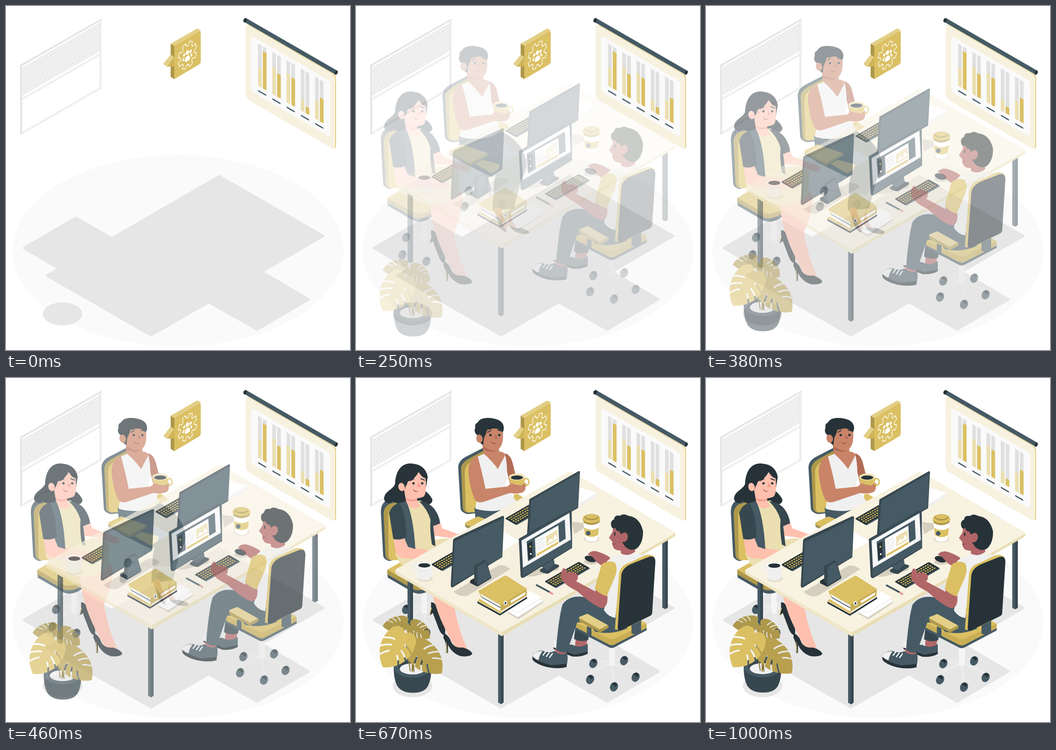
Write an HTML page that moves like this. It is 748 px wide and 748 px high and loops after 1040 ms.

```html
<!DOCTYPE html>
<html lang="en">
<head>
<meta charset="utf-8">
<title>Office teamwork</title>
<style>
html, body { margin: 0; width: 100%; height: 100%; overflow: hidden; background: #fff; }
svg { display: block; width: 100%; height: 100%; }
.ink { fill: #263238; } .deep { fill: #37474f; } .slate { fill: #455a64; }
.gold { fill: #dbc063; } .pale { fill: #ebdfb1; } .mid { fill: #e3cf86; } .bronze { fill: #ae984b; }
.cream { fill: #f8f2e1; } .white { fill: #fff; } .off { fill: #f0f0f0; } .grey { fill: #e0e0e0; }
.shade { fill: #d6cfbf; }
.rose { fill: #ffc0ae; } .tan { fill: #c98468; } .umber { fill: #b26b55; } .plum { fill: #b16668; }
.line { fill: none; stroke-linecap: round; stroke-linejoin: round; }
</style>
</head>
<body>
<svg viewBox="0 0 748 748">
<defs>
  <g id="keys">
    <rect y="2" width="86" height="27" rx="2" fill="#455a64"/>
    <rect width="86" height="26" rx="2" class="ink"/>
    <path d="M4 5H82M5 10.5H82M4 16H82M5 21H82" stroke="#dbc063" stroke-width="3" stroke-dasharray="3.6 2"/>
  </g>
  <g id="wheel">
    <ellipse class="slate" rx="8.5" ry="10.5" transform="rotate(25)"/>
    <path class="ink" d="M-6-6Q1-13 7-5L3 0Q-1-6-6-6"/>
  </g>
  <mask id="slits" maskUnits="userSpaceOnUse" x="-60" y="-30" width="120" height="130">
    <rect x="-60" y="-30" width="120" height="130" fill="#fff"/>
    <path class="line" stroke="#000" stroke-width="3.500" d="M-14 20Q-30 22-46 34M-13 33Q-28 38-42 54M-11 46Q-22 54-30 70M14 20Q30 22 46 34M13 33Q28 38 42 54M11 46Q22 54 30 70"/>
  </mask>
  <g id="leaf" mask="url(#slits)">
    <path d="M0 0C-12-16-37-8-38 24C-39 50-22 70-3 81C22 70 39 50 38 24C37-8 12-16 0 0Z"/>
  </g>
</defs>

<!-- floor -->
<ellipse cx="374" cy="532" rx="360" ry="208" fill="#fafafa"/>
<path d="M464 370L690 500L556 578L658 638L546 703.500L441 644L315 716L89 586L115 571L39 526L152 460.500L230 505Z" fill="#e6e6e6" stroke="#e6e6e6" stroke-width="5" stroke-linejoin="round"/>
<ellipse cx="123" cy="669.500" rx="43" ry="25" fill="#e6e6e6"/>

<!-- window -->
<g id="blinds"></g>
<path class="line" d="M36 202L205 105M36 276L206 178" stroke="#f0f0f0" stroke-width="4.500"/>
<path d="M33 128L208 28L208 180L204 182V34L36 130V278L33 280Z" class="off"/>
<path d="M31 128L208 27L208 30L34 130V279L31 279Z" fill="#e3e3e3"/>
<path d="M204 34V178" stroke="#e3e3e3"/>

<!-- sign -->
<path class="mid" d="M358 82L412 51Q416 48 419 50L424 54L366 88Z"/>
<path class="bronze" d="M358 82L366 87V159L358 154Z"/>
<path class="gold" d="M366 87L419 56Q423.500 54 423.500 59V121Q423 125 420 127L366 159Z"/>
<path class="mid" d="M342 126L358 106L366 111L350 132Z"/>
<path d="M350 132L366 111V131Z" fill="#cfb458"/>
<g transform="matrix(.82 -.47 0 1.13 394.500 107)">
  <path id="gear" class="line" stroke="#fff" stroke-width="1.500"/>
  <g class="white">
    <circle cy="-5" r="4.200"/><path d="M-7 10Q-7 1 0 1Q7 1 7 10Q0 13-7 10Z"/>
    <circle cx="-8.500" cy="-4" r="3"/><path d="M-13 6Q-13 0-7 1Q-9 4-9 7Q-12 7-13 6Z"/>
    <circle cx="8.500" cy="-4" r="3"/><path d="M13 6Q13 0 7 1Q9 4 9 7Q12 7 13 6Z"/>
  </g>
</g>

<!-- wall chart -->
<g transform="translate(523 38) skewY(30)"><rect class="gold" width="194.500" height="162" rx="7"/></g>
<g transform="translate(521 38) skewY(30)"><rect width="195" height="163" rx="8" fill="#f7f1df"/></g>
<g transform="translate(533 64) skewY(30)"><rect width="172" height="122" rx="7" fill="#fafafa"/></g>
<g id="bars" transform="translate(548 82) skewY(30)"></g>
<path class="line" d="M521 31L717 144" stroke="#455a64" stroke-width="9"/>
<ellipse class="ink" cx="520" cy="31" rx="3.500" ry="5" transform="rotate(25 520 31)"/>
<ellipse class="ink" cx="718" cy="145" rx="3" ry="5" transform="rotate(25 718 145)"/>

<!-- woman with mug -->
<g data-from="-45 0">
  <path class="line" d="M318 350V405L275 432M318 405L365 425M318 405L284 400" stroke="#e8e8e8" stroke-width="6"/>
  <use href="#wheel" x="271" y="436"/><use href="#wheel" x="280" y="402"/><use href="#wheel" x="352" y="432"/>
  <path class="slate" d="M223 198Q221 182 238 172L275 153Q300 145 306 160L300 290L243 296Q229 292 228 284Z"/>
  <path class="bronze" d="M229 198Q229 185 245 176L280 157Q298 150 305 160L290 290L243 293Q233 290 233 283Z"/>
  <path class="gold" d="M237 203Q238 190 252 181L285 162Q300 154 306 163L300 290L244 292Q239 290 239 284Z"/>
  <path class="slate" d="M262 330L330 296L400 335L330 372L262 338Z"/>
  <path class="gold" d="M262 325L330 288L400 326L330 364Z"/>
  <path class="slate" d="M340 400Q330 415 332 445L378 440L400 355L350 320Z" opacity=".8"/>
  <path class="tan" d="M334 440L350 438Q352 465 370 480L385 484L382 478Q368 460 372 435L362 490L348 485Z"/>
  <path class="ink" d="M372 478Q380 486 392 482L410 489Q415 494 404 496Q385 496 372 484ZM340 455L352 470L362 492Q354 492 346 476Z"/>
  <path class="slate" d="M258 282Q305 290 350 272Q402 298 406 346Q402 372 372 410L334 408Q332 370 350 345L262 322Z"/>
  <path class="slate" d="M238 323L284 349L322 327V321H238Z"/>
  <path class="bronze" d="M238 317L284 342L321 320V325L284 347L238 322Z"/>
  <path class="gold" d="M238 317Q236 315 240 313L266 301L321 320L284 342Z"/>
  <path class="gold" d="M344 253L352 252L369 263L352 273L342 268Z"/>
  <path class="umber" d="M318 162Q336 164 341 184L347 208L372 232L362 247L336 232Z"/>
  <path class="off" d="M264 171L286 162L316 165L324 163Q333 200 326 235L349 268Q345 282 305 289Q275 290 260 284Q268 245 264 205Z"/>
  <path class="tan" d="M274 135L310 140L312 160Q322 160 325 168L309 198Q298 182 278 164Z"/>
  <path class="tan" d="M265 169Q244 179 245 205Q248 240 258 262Q263 274 279 269L335 250Q362 255 367 241L364 230L342 228L330 236L282 241Q279 225 273 200Z"/>
  <path class="umber" d="M278 148Q292 160 309 157L300 160Q288 162 276 154Z"/>
  <path class="tan" d="M274 108L319 102Q324 145 311 154Q292 160 276 147Z"/>
  <path class="ink" d="M266 126Q255 118 260 108Q258 100 265 97Q271 85 293 87Q321 90 322 108Q322 115 319 118Q310 108 298 110Q289 113 286 112Q284 121 279 130L277 146Q270 142 266 134Z"/>
  <ellipse class="tan" cx="269" cy="132" rx="7" ry="9" transform="rotate(-15 269 132)"/>
  <circle class="ink" cx="293" cy="124" r="2.600"/><circle class="ink" cx="312" cy="124" r="2.600"/>
  <path class="umber" d="M304 122L309 132L302 132Z"/>
  <path class="line" d="M287 118L294 114M309 113L316 115" stroke="#263238" stroke-width="2"/>
  <path class="line" d="M295 139Q300 146 304 141" stroke="#7f3f34" stroke-width="1.200" fill="#fff"/>
  <ellipse cx="371" cy="226" rx="5.500" ry="7.500" class="line" stroke="#dbc063" stroke-width="3"/>
  <path class="gold" d="M333 215H368L365 229Q360 236 350 236Q340 235 336 228Z"/>
  <ellipse class="pale" cx="350.500" cy="215" rx="17.500" ry="7.500"/><ellipse class="ink" cx="350.500" cy="216.500" rx="13" ry="4.500"/>
  <path class="tan" d="M330 236Q340 225 346 232Q358 232 369 237Q370 248 358 250L335 250Z"/>
</g>

<!-- seated woman -->
<g data-from="0 0">
  <path class="line" d="M148 460V492L112 502M148 492L105 536M148 492L153 548M148 492L185 520M148 492L180 487" stroke="#ebebeb" stroke-width="6"/>
  <path d="M142 465H154V512H142Z" fill="#f5f5f5"/>
  <use href="#wheel" x="109" y="503"/><use href="#wheel" x="101" y="541"/><use href="#wheel" x="153" y="555"/>
  <path class="slate" d="M54 292Q54 270 70 265L98 260V392L72 398Q60 394 59 386Z"/>
  <path class="bronze" d="M60 295Q61 278 75 273L98 268V392L72 396Q64 392 64 384Z"/>
  <path class="gold" d="M70 302Q70 286 82 280L98 275V396L75 396Q71 392 71 386Z"/>
  <path class="slate" d="M68 420L125 396L195 430L162 461Q142 473 126 467L69 434Z"/>
  <path class="bronze" d="M68 417L125 390L195 424L162 454Q142 465 126 460L68 427Z"/>
  <path class="gold" d="M68 417L122 386L195 420L164 444Q142 455 126 450Z"/>
  <path class="rose" d="M165 410L215 400Q214 470 200 500L187 545L180 545Q175 500 166 470Z"/>
  <path class="ink" d="M163 488Q173 486 177 505L192 535Q196 553 192 559Q184 558 178 540L167 511L161 516Q164 502 163 488Z"/>
  <path class="rose" d="M160 405Q236 385 232 425Q226 465 213 492Q220 540 242 590L216 586Q180 525 172 488Q160 455 160 405Z"/>
  <path class="ink" d="M191 554Q203 561 207 574Q214 588 232 586Q250 591 253 600Q248 607 228 605Q209 599 200 580L200 598L196 598Q197 575 190 565Z"/>
  <path class="line" d="M164 500L160 515M196 575L198 598" stroke="#dbc063" stroke-width="1.500"/>
  <path class="pale" d="M85 382L125 348L172 352Q208 342 225 362L222 412Q180 445 140 426L96 404Z"/>
  <path class="rose" d="M168 312L182 312L188 327L243 347Q255 360 236 360L200 347L170 343Z"/>
  <path class="ink" d="M121 186C98 184 86 204 85 230C81 243 61 246 61 263C64 275 76 273 80 268Q110 285 150 275Q167 276 166 264Q160 252 151 246L156 215Q151 188 121 186Z"/>
  <path class="pale" d="M100 273L140 266Q160 280 164 310L175 365Q150 380 120 370Z"/>
  <path class="deep" d="M137 268Q161 270 172 287Q181 300 183 316L168 322Q170 340 173 366L165 362Q160 330 162 308Q155 285 137 268Z"/>
  <path class="rose" d="M104 240L132 245V262Q135 275 141 278Q125 290 110 275Z"/>
  <path class="rose" d="M81 347L110 346L114 367L172 377L208 388Q196 402 170 398L104 392Q87 389 86 376Z"/>
  <path class="slate" d="M90 273L109 268Q125 300 129 372L113 367L104 345Z"/>
  <path class="deep" d="M72 293Q78 276 94 272Q108 290 110 346Q96 354 81 350Z"/>
  <path d="M108 261Q125 268 134 261L132 266Q120 271 108 265Z" fill="#f29c8e"/>
  <path class="rose" d="M106 222L136 205L151 215Q155 250 147 258Q128 266 108 258Z"/>
  <path class="ink" d="M104 235Q101 214 114 203L137 202Q130 219 113 225Q110 233 107 238ZM136 203Q142 217 154 219L150 204Z"/>
  <ellipse class="rose" cx="99" cy="237" rx="7" ry="9" transform="rotate(-15 99 237)"/>
  <circle class="ink" cx="125" cy="229" r="2.600"/><circle class="ink" cx="144" cy="229" r="2.600"/>
  <path d="M136 227L141 237L133 237Z" fill="#f59a91"/>
  <path class="line" d="M118 223L126 219M141 219L149 222" stroke="#263238" stroke-width="2"/>
  <path class="line" d="M125 243Q130 249 134 246" stroke="#a34b42" stroke-width="1.400"/>
</g>

<!-- desk -->
<g data-from="0 -45">
  <path class="slate" d="M112 440H119V594L112 590ZM309 555H316V710L309 706ZM666 350H672V503L666 500Z"/>
  <path class="deep" d="M118 440H124V591L118 594ZM315 555H321V706L315 710ZM672 350H678V500L672 503Z"/>
  <path fill="#f0e7c8" d="M85 419L317 550V562L88 428Q84 424 85 419Z"/>
  <path fill="#e9deb5" d="M317 550L694 337Q696 344 691 346L317 562Z"/>
  <path class="cream" d="M87 416L461 205Q465 203 469 205L693 335Q695 337 693 339L319 552Q316 553 313 551L87 421Q84 418 87 416Z"/>
  <path class="shade" d="M212 465L310 408Q325 406 335 416L243 474Q225 478 212 465ZM470 313L494 316L496 327L474 340ZM360 432L396 414L443 407L440 418L386 432Z"/>
  <path class="off" d="M482 276L523 250V257L484 282Z"/><path class="white" d="M486 238L523 250L482 275ZM318 333L356 355L320 376Z"/>
  <use href="#keys" transform="matrix(.866 -.5 .866 .5 163 406)"/>
  <use href="#keys" transform="matrix(.866 -.5 .866 .5 324 306)"/>

  <!-- monitors -->
  <path class="deep" d="M377 264L484 203Q487 202 487 206L483 283L374 346Q371 345 372 339Z"/>
  <path class="slate" d="M381 267L486 207L482 281L376 342Z"/>
  <path class="ink" d="M248 441L262 433L294 430V436L264 454L248 446Z"/>
  <path class="deep" d="M211 354Q211 351 214 349L317 301Q322 299 322 304L318 390L210 456Q206 456 206 451Z"/>
  <path class="slate" d="M215 356L321 305L317 389L210 452Z"/>
  <path class="deep" d="M257 409L280 396L285 402L294 434L264 452L257 441Z"/>
  <path class="slate" d="M264 411L282 400L294 434L264 451Z"/>
  <path class="deep" d="M400 417L425 403L441 407V411L418 426Q412 427 400 421Z"/>
  <path class="slate" d="M402 410L430 393L432 405L417 419Z"/>
  <path class="deep" d="M354 350L462 289Q467 288 469 293L470 370L364 435Q359 436 358 431Z"/>
  <path class="slate" d="M359 351L466 291L470 368L363 433Z"/>
  <path fill="#f7f7f7" d="M360 354L464 294L467 352L363 413Z"/>
  <path class="slate" d="M371 356L454 308L456 350L374 399Z"/>
  <path class="ink" d="M373 361L383 355L384 390L375 396Z"/>
  <path class="white" d="M389 350L440 321L442 364L391 393Z"/>
  <path class="pale" d="M413 345L438 330L439 352L414 366Z"/>
  <path class="white" d="M415 362L422 350L428 352L433 340L438 349Z"/>
  <path class="line" d="M392 357L409 347M392 362L409 352M393 367L410 357M393 372L410 362M393 377L410 367" stroke="#d9d9d9" stroke-width="1.200"/>
  <path class="gold" d="M393 383L440 356V361L393 388Z"/>
  <circle class="gold" cx="379" cy="367" r="2"/><circle class="white" cx="380" cy="383" r="2"/>

  <!-- things -->
  <ellipse class="shade" cx="150" cy="436" rx="17" ry="8" opacity=".5"/>
  <ellipse cx="129" cy="414" rx="6" ry="8" class="line" stroke="#f0f0f0" stroke-width="4"/>
  <path class="off" d="M132 408H165L164 434Q159 440 149 440Q138 440 134 434Z"/>
  <ellipse class="white" cx="148.500" cy="407" rx="16.500" ry="7"/><ellipse class="ink" cx="148.500" cy="408" rx="13" ry="4.800"/>
  <ellipse class="shade" cx="512" cy="350" rx="17" ry="8" opacity=".6"/>
  <path class="white" d="M495 312H529L525 352Q512 360 499 352Z"/>
  <path class="gold" d="M496 326Q512 335 528 326L526 342Q512 350 498 342Z"/>
  <path class="bronze" d="M493 306Q512 317 531 306L529 315Q512 325 495 315Z"/>
  <ellipse class="gold" cx="512" cy="306" rx="19" ry="9.500"/><ellipse class="bronze" cx="512" cy="303" rx="15" ry="7"/><ellipse class="gold" cx="512" cy="301.500" rx="13" ry="5"/>
  <circle class="slate" cx="505" cy="338" r="5"/>
  <path class="shade" d="M330 512L384 472L408 488L353 525Z"/>
  <path class="white" d="M328 508L374 468L407 485L352 520ZM332 500L378 464L404 477L350 510Z"/>
  <path d="M332 502L350 511L404 479M330 508L352 521L407 486" fill="none" stroke="#e3e3e3"/>
  <path class="ink" d="M264 486L313 513L372 476V480L313 517L264 490Z"/>
  <path class="gold" d="M266 463L316 491V513L264 485L272 478Z"/>
  <path class="off" d="M270 469L314 494V499L274 477Z"/>
  <path class="white" d="M268 480L274 477L314 500V508Z"/>
  <path d="M273 477L314 500" stroke="#455a64" stroke-width="1.500"/>
  <path fill="#c9ae55" d="M314 491L371 459V474L314 508Z"/>
  <path class="gold" d="M267 463L322 431Q325 429 328 431L372 459L315 493L266 466Z"/>
  <path class="white" d="M336 485L368 466V471L337 490Z"/>
  <ellipse class="white" cx="325" cy="490" rx="4" ry="5"/><ellipse class="slate" cx="325" cy="490" rx="2" ry="3"/>
  <path class="line" d="M393 451L421 466" stroke="#455a64" stroke-width="4"/><path class="line" d="M422 466.500L427 470" stroke="#e49a92" stroke-width="4"/>
  <use href="#keys" transform="matrix(.866 -.5 .866 .5 410 443)"/>
  <ellipse class="shade" cx="511" cy="400" rx="15" ry="6"/>
  <ellipse class="ink" cx="510" cy="394" rx="13" ry="6.500" transform="rotate(15 510 394)"/>
</g>

<!-- man -->
<g data-from="0 -45">
  <path class="line" d="M556 620L516 615M556 620L512 640M556 625L561 660M556 620L604 640M556 618L582 610" stroke="#ebebeb" stroke-width="6"/>
  <path d="M550 580H563V626H550Z" fill="#f5f5f5"/>
  <use href="#wheel" x="516" y="621"/><use href="#wheel" x="509" y="656"/><use href="#wheel" x="561" y="672"/><use href="#wheel" x="608" y="651"/><use href="#wheel" x="583" y="615"/>
  <path class="plum" d="M478 565L503 570L500 586L476 585Z"/>
  <path class="deep" d="M480 520L508 530L505 570Q490 576 474 568Z"/>
  <path class="slate" d="M432 569Q450 582 470 580Q487 590 504 578V598Q495 606 474 605L430 586Z"/>
  <path class="off" d="M431 568Q440 574 443 582L438 592L429 587Z"/>
  <path class="ink" d="M429 586L475 602L504 596V600Q490 608 470 606L430 590Z"/>
  <path class="plum" d="M434 588L458 592L456 607L431 605Z"/>
  <path class="slate" d="M384 602Q392 593 405 593Q422 600 431 594Q447 606 459 598Q462 615 457 628Q440 632 420 628Q395 618 384 608Z"/>
  <path class="off" d="M383 606Q386 594 406 594Q398 604 397 614L386 611Z"/>
  <path class="ink" d="M383 606Q400 620 425 625L458 622V629Q440 634 415 629Q390 622 384 613Z"/>
  <path class="line" d="M407 603L413 595M414 606L420 598M421 608L427 600" stroke="#fff" stroke-width="2.500"/>
  <path class="slate" d="M476 538L556 496L632 540V549L562 586Q556 589 550 586L477 548Z"/>
  <path fill="#c9ae55" d="M476 534L556 498L632 536V544L562 580Q556 583 550 580L478 543Z"/>
  <path class="gold" d="M477 532L556 494L632 534L562 567Q556 569 550 567Z"/>
  <path class="slate" d="M565 515Q545 490 520 484Q470 464 449 493Q441 520 435 591Q447 600 459 596Q466 575 481 532Q502 530 520 552Q555 560 590 545Z"/>
  <path class="plum" d="M504 384Q510 376 522 377Q540 382 553 391L542 411Q529 407 522 399Q514 388 504 384Z"/>
  <path class="off" d="M546 398Q565 383 605 382L632 386Q590 400 577 412Q570 425 568 470L564 522Q548 520 539 505Q548 475 545 430Z"/>
  <path class="plum" d="M576 355L607 358V378Q592 390 576 382Z"/>
  <path class="gold" d="M563 547L572 425Q575 408 595 402L628 386Q645 382 650 392L575 549Z"/>
  <path class="ink" d="M569 543L577 428Q580 413 598 405L638 389Q651 386 651 400L644 512Q643 516 639 518L576 549Q569 551 569 543Z"/>
  <path class="slate" d="M599 538L620 528V551L608 558L599 556Z"/>
  <path class="plum" d="M521 455L546 470Q550 497 535 501Q518 498 481 464Q455 452 447 438Q443 424 451 414Q457 414 459 424Q470 420 482 428Q484 440 478 442L521 465Z"/>
  <path class="gold" d="M534 406Q548 395 563 402Q571 416 561 438L545 475Q528 470 519 458Z"/>
  <path class="slate" d="M502 540L512 544V566L502 562Z"/>
  <path class="bronze" d="M485 521L530 546L549 538V544L531 554L486 530Z"/>
  <path class="mid" d="M485 522Q484 520 488 519L503 513L548 538L530 547Z"/>
  <path class="plum" d="M559 325L596 320L600 350Q588 380 570 375Q557 374 557 356L550 348L558 335Z"/>
  <path class="ink" d="M556 325Q551 312 561 308Q562 298 574 300Q581 294 592 300Q617 303 624 333Q625 357 612 370Q600 379 586 368L579 358L581 342Q574 340 573 334Q565 334 564 326Q560 330 556 325Z"/>
  <ellipse class="plum" cx="583" cy="347" rx="8" ry="10.500" transform="rotate(15 583 347)"/>
  <path class="ink" d="M561 337L564 335L564 343L561 343Z"/>
  <path class="line" d="M558 362L564 361" stroke="#7b3b40" stroke-width="1.300"/>
</g>

<!-- plant -->
<g data-from="0 45">
  <path class="deep" d="M82 628Q82 657 91 671Q101 684 124 684Q148 684 156 670Q164 655 164 628Z"/>
  <ellipse class="slate" cx="123" cy="628" rx="41" ry="23"/>
  <ellipse class="deep" cx="123" cy="629" rx="31" ry="16"/>
  <ellipse class="off" cx="123" cy="632" rx="28" ry="12"/>
  <path class="line" d="M122 638Q124 590 106 556M126 636Q122 575 110 531M118 636Q113 605 108 570M126 638Q124 600 128 586M124 634Q116 570 120 540" stroke="#8f7c3c" stroke-width="2.200"/>
  <g fill="#ae984b">
    <use href="#leaf" transform="translate(110 531) rotate(80) scale(.45 .65)"/>
    <use href="#leaf" transform="translate(119 537) rotate(-58) scale(.52 .62)"/>
    <use href="#leaf" transform="translate(125 583) rotate(-48) scale(.82 1.05)" fill="#b8a04e"/>
    <use href="#leaf" transform="translate(106 555) rotate(31) scale(.93 1.08)" fill="#dbc063"/>
  </g>
</g>
</svg>
<script>
const $ = id => document.getElementById(id);
const rect = (x, y, w, h, fill) => `<rect x="${x}" y="${y}" width="${w}" height="${h}" class="${fill}"/>`;

// Chart: empty part of the pale and the gold bar in each pair
$('bars').innerHTML = [[51, 10], [31, 40], [27, 31], [65, 76], [50, 39]].map((pair, i) =>
  pair.map((gap, j) => {
    const x = 31 * i + 10.5 * j;
    return rect(x, 0, 8, 91, 'grey') + rect(x, gap, 8, 91 - gap, j ? 'gold' : 'pale');
  }).join('') +
  `<path class="line" d="M${31 * i + 1.5} 102h15" stroke="#455a64" stroke-width="3"/>`).join('');

$('blinds').innerHTML = Array.from({length: 11}, (_, i) => {
  const y = 135 + 5.6 * i;
  return `<path d="M36 ${y}L205 ${y - 97}" stroke="#f3f3f3" stroke-width="4"/>` +
    `<path d="M36 ${y + 2}L205 ${y - 95}" stroke="#dedede" stroke-width="1.3"/>`;
}).join('');

const teeth = [];
for (let i = 0; i < 8; i++)
  for (const [turn, r] of [[-.29, 18], [-.17, 25], [.17, 25], [.29, 18]]) {
    const a = (i + .5) * Math.PI / 4 + turn;
    teeth.push(`${r * Math.cos(a)} ${r * Math.sin(a)}`);
  }
$('gear').setAttribute('d', `M${teeth.join('L')}Z`);

// cubic-bezier(.36, -.01, .5, 1.38)
const curve = (s, a, b) => 3 * (1 - s) ** 2 * s * a + 3 * (1 - s) * s * s * b + s ** 3;
function ease(x) {
  if (x >= 1) return 1;
  let lo = 0, hi = 1;
  for (let i = 0; i < 30; i++) {
    const s = (lo + hi) / 2;
    if (curve(s, .36, .5) < x) lo = s; else hi = s;
  }
  return curve(lo, -.01, 1.38);
}

const parts = [...document.querySelectorAll('[data-from]')].map(node =>
  ({node, from: node.dataset.from.split(' ').map(Number)}));

function draw() {
  const t = performance.now() % 1040;
  const step = Math.floor((t + 4) * 24 / 1000);  // 24 poses per second
  const p = step < 2 ? 0 : ease(step / 24);
  for (const {node, from: [x, y]} of parts) {
    node.setAttribute('transform', `translate(${x * (1 - p)} ${y * (1 - p)})`);
    node.setAttribute('opacity', Math.min(1, Math.max(0, p)));
  }
  requestAnimationFrame(draw);
}
draw();
</script>
</body>
</html>
```
